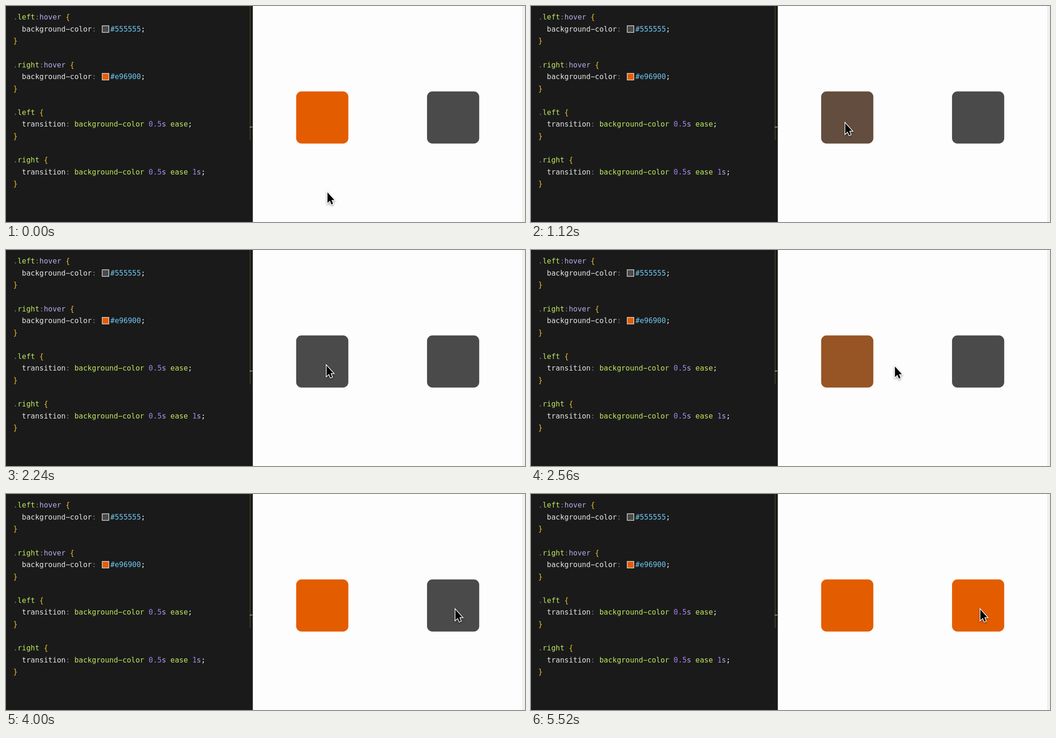
Animation of 1112x464 px, one loop 5.6 s. Source, as an HTML page with a canvas:

```html
<!DOCTYPE html>
<html lang="en">
<head>
<meta charset="utf-8">
<title>Transition delay</title>
<style>
  html, body { margin: 0; width: 100%; height: 100%; overflow: hidden; background: #fdfdfd; }
  canvas { display: block; }
</style>
</head>
<body>
<canvas id="stage" width="1112" height="464"></canvas>
<script>
const ctx = document.getElementById("stage").getContext("2d");
const LOOP = 5600, STEP = 80;
const CHAR = 9.36, LEFT = 15.4, BASELINE = 29.3, LINE = 25.57;
const ORANGE = [227, 93, 0], GRAY = [74, 74, 74];

const ink = {
  dim: "#7c7c7c", green: "#c0e860", violet: "#b9aaea", gold: "#e9bf2d",
  white: "#e6e6e6", blue: "#70c8f0", number: "#a284ee", bright: "#f4f4f4"
};

// Each token is [column, text, ink].
const selector = (name, pseudo) => {
  const tokens = [[0, ".", "dim"], [1, name, "green"]];
  let column = name.length + 1;
  if (pseudo) {
    tokens.push([column, ":", "dim"], [column + 1, pseudo, "violet"]);
    column += pseudo.length + 1;
  }
  return [...tokens, [column + 1, "{", "gold"]];
};
const property = name => [[2, name, "white"], [2 + name.length, ":", "dim"]];
const colorRule = hex => [
  ...property("background-color"), [22.24, hex, "blue"], [29.24, ";", "bright"]
];
const easeRule = delay => [
  ...property("transition"), [14, "background-color", "green"],
  [31, "0.5", "number"], [34, "s", "violet"], [36, "ease", "green"],
  ...(delay ? [[41, delay, "number"], [42, "s", "violet"], [43, ";", "bright"]] : [[40, ";", "bright"]])
];
const close = [[0, "}", "gold"]];
const lines = [
  selector("left", "hover"), colorRule("#555555"), close, [],
  selector("right", "hover"), colorRule("#e96900"), close, [],
  selector("left"), easeRule(), close, [],
  selector("right"), easeRule("1"), close
];

// Pointer path: [ms, x, y].
const path = [
  [0, 688, 399], [160, 688, 399], [480, 686, 376], [800, 680, 317],
  [880, 677, 287], [1040, 673, 256], [1280, 672, 245], [2080, 672, 245],
  [2240, 686, 247], [2400, 732, 249], [2480, 766, 249], [2560, 779, 249],
  [3120, 873, 248], [3280, 904, 247], [3440, 940, 247], [3680, 962, 247], [LOOP, 962, 247]
];

const slope = (i, k) => (path[i + 1][k] - path[i][k]) / (path[i + 1][0] - path[i][0]);

function tangent(i, k) {
  if (i === 0 || i === path.length - 1) return 0;
  const a = slope(i - 1, k), b = slope(i, k);
  return a * b > 0 ? 2 * a * b / (a + b) : 0;
}

// Monotone cubic interpolation, so the pointer never overshoots.
function pointerAt(t) {
  const i = Math.max(0, path.findIndex(p => p[0] > t) - 1);
  const span = path[i + 1][0] - path[i][0], u = (t - path[i][0]) / span;
  return [1, 2].map(k => {
    const v = 1 - u;
    return path[i][k] * (1 + 2 * u) * v * v + path[i + 1][k] * u * u * (3 - 2 * u)
      + span * u * v * (tangent(i, k) * v - tangent(i + 1, k) * u);
  });
}

// CSS "ease": cubic-bezier(.25, .1, .25, 1).
function ease(x) {
  if (x <= 0) return 0;
  if (x >= 1) return 1;
  const bezier = (a, b, s) => 3 * a * s * (1 - s) ** 2 + 3 * b * s * s * (1 - s) + s ** 3;
  let low = 0, high = 1;
  for (let n = 0; n < 24; n++) {
    const mid = (low + high) / 2;
    if (bezier(0.25, 0.25, mid) < x) low = mid; else high = mid;
  }
  return bezier(0.1, 1, low);
}

const fade = (t, start) => ease((t - start) / 500);
const mix = (a, b, p) => `rgb(${a.map((v, i) => Math.round(v + (b[i] - v) * p)).join()})`;

function rect(color, x, y, w, h) {
  ctx.fillStyle = color;
  ctx.fillRect(x, y, w, h);
}

function swatch(row, color) {
  const y = BASELINE + row * LINE - 13.1;
  rect("#e8e8e8", 205.5, y, 15.5, 15.5);
  rect(color, 206.8, y + 1.3, 12.9, 12.9);
}

function drawEditor() {
  rect("#1a1a1a", 0, 0, 529, 464);
  rect("#3a3d20", 522, 0, 2, 288);
  rect("#8c8c84", 522, 259, 6, 2);
  rect("#444", 528, 0, 1, 464);
  ctx.font = "15.55px 'DejaVu Sans Mono', monospace";
  lines.forEach((tokens, row) => {
    for (const [column, text, tone] of tokens) {
      ctx.fillStyle = ink[tone];
      // The editor face has a wide hyphen.
      ctx.fillText(text.replace("-", "\u2212"), LEFT + column * CHAR, BASELINE + row * LINE);
    }
  });
  swatch(1, "#4a4a4a");
  swatch(5, "#e35d00");
}

function drawBox(x, color) {
  ctx.fillStyle = color;
  ctx.beginPath();
  ctx.roundRect(x, 183.6, 111.8, 111.8, 11.4);
  ctx.fill();
}

function drawPointer([x, y]) {
  const arrow = new Path2D("M.8 1.3V24L6 19.2L9.3 27.2L12.6 25.8L9.4 17.8H15.6Z");
  ctx.save();
  ctx.translate(x, y);
  ctx.lineWidth = 2.9;
  ctx.strokeStyle = "#fff";
  ctx.shadowColor = "rgba(0,0,0,.4)";
  ctx.shadowBlur = 4;
  ctx.shadowOffsetY = 2;
  ctx.stroke(arrow);
  ctx.shadowColor = "transparent";
  ctx.fillStyle = "#000";
  ctx.fill(arrow);
  ctx.restore();
}

function draw(t) {
  rect("#fdfdfd", 529, 0, 583, 464);
  rect("#d8d8d8", 1107, 0, 1, 464);
  rect("#f7f7f7", 1108, 0, 3, 464);
  rect("#dedede", 1111, 0, 1, 464);
  drawEditor();
  drawBox(621.7, mix(ORANGE, GRAY, fade(t, 850) - fade(t, 2412)));
  drawBox(902.1, mix(GRAY, ORANGE, fade(t, 4298)));
  drawPointer(pointerAt(t));
}

function tick() {
  draw(Math.floor(performance.now() % LOOP / STEP) * STEP);
  requestAnimationFrame(tick);
}
tick();
</script>
</body>
</html>
```
